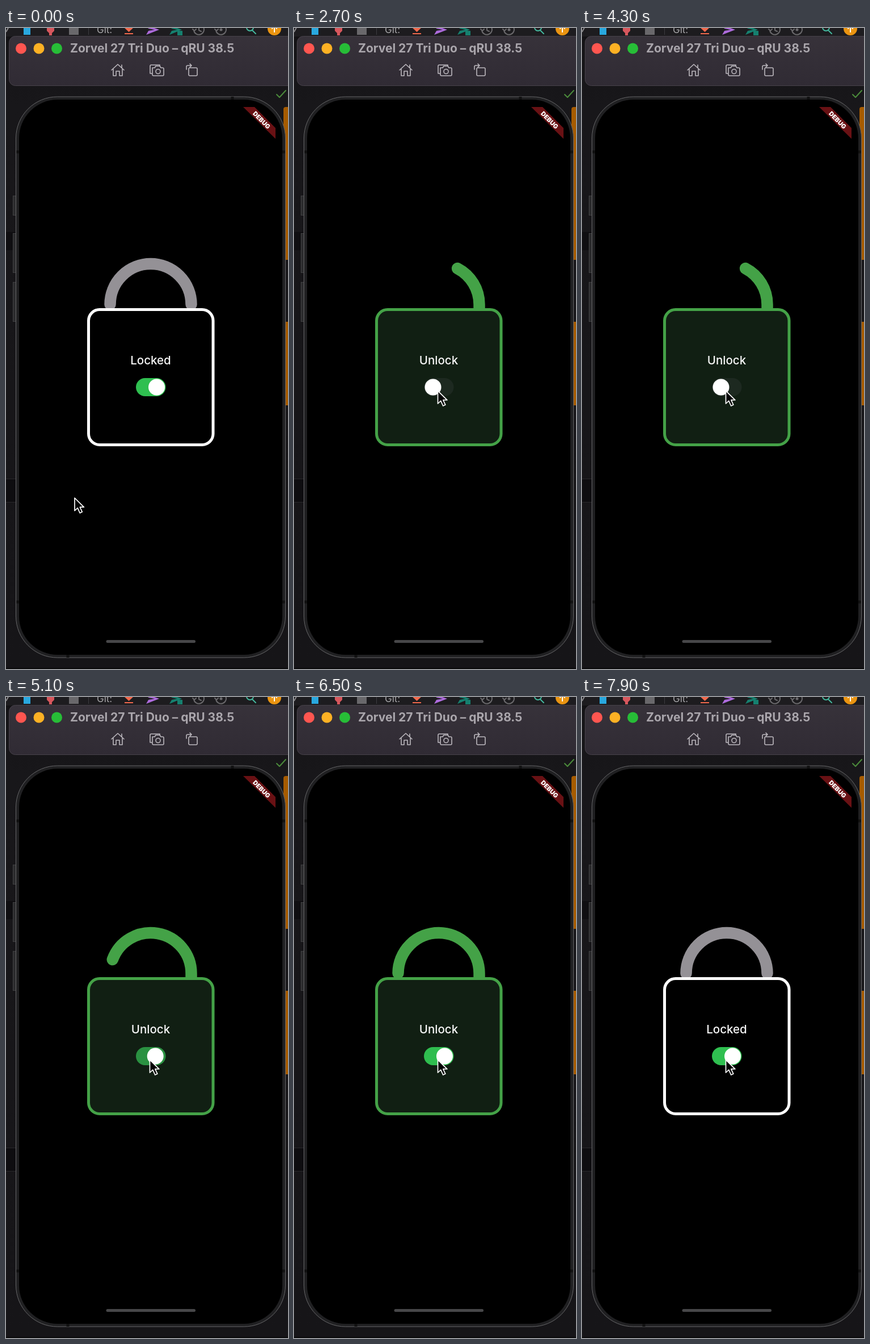
An HTML page for the animation above (8 s loop, 497 px wide and 1128 px high).

```html
<!DOCTYPE html>
<html lang="en">
<head>
<meta charset="utf-8">
<title>Padlock switch</title>
<style>
  html, body { margin: 0; width: 100%; height: 100%; overflow: hidden; background: #18171a; }
  svg { display: block; width: 100%; height: 100%; }
  text { font-family: Inter, sans-serif; }
  .line { fill: none; stroke-linecap: round; stroke-linejoin: round; }
</style>
</head>
<body>
<svg viewBox="0 0 497 1128">
  <defs>
    <linearGradient id="shade" x2="0" y2="1">
      <stop offset="0" stop-color="#0f0e10"/>
      <stop offset=".03" stop-color="#151417"/>
      <stop offset=".12" stop-color="#18171a"/>
      <stop offset="1" stop-color="#161518"/>
    </linearGradient>
    <linearGradient id="bar" x2="0" y2="1">
      <stop offset="0" stop-color="#37323a"/>
      <stop offset="1" stop-color="#302b34"/>
    </linearGradient>
  </defs>

  <!-- Desktop behind the window -->
  <rect width="497" height="1128" fill="url(#shade)"/>
  <rect y="359" width="18" height="32" fill="#0f0e11"/>
  <rect y="793" width="18" height="42" fill="#0e0d10"/>
  <path d="M0 793.5H17M0 834.5H17" stroke="#29282b"/>
  <rect x="489" y="139" width="12" height="269" rx="4" fill="#a65b00"/>
  <rect x="491" y="517" width="10" height="147" fill="#a65b00"/>
  <path class="line" d="M477 117L482 122L493 110" stroke="#4b8b3b" stroke-width="2"/>
  <rect y="1126" width="497" height="2" fill="#09090a"/>

  <!-- Editor toolbar -->
  <rect width="497" height="15" fill="#1d1c1f"/>
  <path d="M0 7L4 0" stroke="#8a898c" stroke-width="2"/>
  <rect x="31" y="0" width="12" height="12" fill="#29a8df"/>
  <path d="M72 0H85V5L81 9V13H76V9L72 5Z" fill="#d7575d"/>
  <rect x="111" y="-5" width="17" height="17" fill="#69686b"/>
  <path d="M145.5 0V12" stroke="#3d3c40"/>
  <text x="160" y="9" font-size="17" fill="#a7a6a9">Git:</text>
  <path d="M209 0H224L216.500 7ZM209 9H224V11H209Z" fill="#f2694d"/>
  <path d="M247 -5L270 3L247 12L251 5L262 3L251 1Z" fill="#ad6bdc"/>
  <path d="M288 -5L310 3L288 12L292 5L302 3L292 1Z" fill="#16806f"/>
  <rect x="302" y="5" width="9" height="8" fill="#16806f"/>
  <g class="line" stroke="#69686b" stroke-width="2">
    <path d="M331 4A9 9 0 1 0 334 -4M329 2L332 5L335 2M340 -2V4L344 6"/>
    <path d="M370 4A9 9 0 1 0 373 -4M368 2L371 5L374 2"/>
  </g>
  <circle cx="379" cy="3" r="2.500" fill="#69686b"/>
  <path class="line" d="M434 4L440 10M424 -1A6 6 0 1 0 436 -1A6 6 0 1 0 424 -1" stroke="#43b79d" stroke-width="2"/>
  <circle cx="473" cy="1" r="12" fill="#ea9411"/>
  <path class="line" d="M473 7V-4M469 1L473 -4L477 1" stroke="#fff" stroke-width="2"/>

  <!-- Simulator title bar -->
  <rect x="5.500" y="14.500" width="510" height="87" rx="11" fill="url(#bar)" stroke="#47424a"/>
  <circle cx="26.500" cy="36" r="9.500" fill="#ff5650"/>
  <circle cx="58" cy="36" r="9.500" fill="#fdb124"/>
  <circle cx="89.500" cy="36" r="9.500" fill="#27bd37"/>
  <text x="113" y="43" font-size="21" font-weight="700" fill="#aaa6ac">Zorvel 27 Tri Duo – qRU 38.5</text>
  <g class="line" stroke="#bcb8be" stroke-width="1.600">
    <path d="M186 74L197 64L208 74M189 72V84H194V76H200V84H205V72M204 70V65"/>
    <path d="M257 80H254V67Q254 65 256 65H271V67M258 70H262L264 67H271L273 70H276Q278 70 278 72V82Q278 84 276 84H260Q258 84 258 82Z"/>
    <circle cx="268" cy="76.500" r="4"/>
    <rect x="322" y="70" width="15" height="14" rx="2"/>
    <path d="M318 73V68Q318 66 320 66H327M324 63L327 66L324 69"/>
  </g>

  <!-- Phone -->
  <g fill="#2b2b2d" stroke="#414143">
    <rect x="12.500" y="295.500" width="7" height="34"/>
    <rect x="12.500" y="361.500" width="7" height="69"/>
    <rect x="12.500" y="447.500" width="7" height="69"/>
  </g>
  <rect x="17.500" y="121" width="475" height="987" rx="73" fill="#202022" stroke="#666668"/>
  <path d="M18 218H23M487 218H492M18 1010H23M487 1010H492M399 121V126M109 1103V1108" stroke="#111" stroke-width="5"/>
  <rect x="23" y="126" width="464" height="977" rx="68"/>
  <path d="M418 139H438L475 176V195Z" fill="#691114"/>
  <text transform="translate(450.500 162) rotate(45)" y="4" text-anchor="middle" font-size="11" font-weight="900" fill="#fff">DEBUG</text>
  <rect x="176.500" y="1077" width="157.500" height="5" rx="2.500" fill="#474749"/>

  <!-- Padlock -->
  <path id="shackle" class="line" stroke-width="20.500"/>
  <rect id="body" x="145.500" y="495.500" width="219.500" height="238" rx="19.500" stroke-width="5"/>
  <text id="label" x="255" y="592" text-anchor="middle" font-size="20.500" font-weight="500" fill="#f7f7f7"></text>
  <rect id="track" x="229" y="616" width="52.500" height="32" rx="16"/>
  <circle id="thumb" cy="632" r="14.500" fill="#fff"/>

  <path id="cursor" d="M0 0V22.500L5.200 17.700L9.200 26.500L13.300 24.600L9.300 16.200H16.300Z" stroke="#fff" stroke-width="1.700" stroke-linejoin="round"/>
</svg>
<script>
const LOOP = 8000;
const SHACKLE_MS = 300;
const SWITCH_MS = 290;
const OPEN_ANGLE = 62.5;
const CENTER = { x: 255, y: 486.5, r: 71.5 };
// Clicks alternate: unlock, lock, unlock, ...
const CLICKS = [1750, 2850, 3600, 4350, 5050, 5725, 6500, 7250];

const el = id => document.getElementById(id);
const set = (id, attrs) => {
  for (const name in attrs) el(id).setAttribute(name, attrs[name]);
};
const progress = (t, start, length) => Math.min(1, Math.max(0, (t - start) / length));
const smooth = p => p * p * (3 - 2 * p);
const mix = (a, b, p) => a + (b - a) * p;
const mixColor = (a, b, p) => `rgb(${a.map((v, i) => Math.round(mix(v, b[i], p)))})`;

function drawLock(t) {
  const count = CLICKS.filter(click => click <= t).length;
  const locked = count % 2 === 0;
  const since = count ? t - CLICKS[count - 1] : LOOP;
  const toward = p => locked ? p : 1 - p;

  const sweep = mix(OPEN_ANGLE, 180, toward(progress(since, 0, SHACKLE_MS)));
  const angle = sweep * Math.PI / 180;
  const { x, y, r } = CENTER;
  const foot = locked ? '' : `M${x + r} ${y + 8}V${y}`;
  set('shackle', {
    d: `${foot || `M${x + r} ${y}`}A${r} ${r} 0 0 0 ${x + r * Math.cos(angle)} ${y - r * Math.sin(angle)}`,
    stroke: locked ? '#949196' : '#44a247'
  });
  set('body', {
    fill: locked ? '#000' : '#111f13',
    stroke: locked ? '#fff' : '#44a247'
  });
  el('label').textContent = locked ? 'Locked' : 'Unlock';

  const on = toward(smooth(progress(since, -10, SWITCH_MS)));
  const off = locked ? [29, 34, 34] : [29, 41, 32];
  set('track', { fill: mixColor(off, [47, 191, 80], on ** 3) });
  set('thumb', { cx: mix(245, 265.5, on) });
}

function drawCursor(t) {
  const approach = smooth(progress(t, 100, 1000));
  const settle = smooth(progress(t, 1350, 300));
  const x = mix(121, 252.5, approach) + settle;
  const y = mix(827, 647, approach) - 8.5 * settle;
  set('cursor', { transform: `translate(${x} ${y})` });
}

function frame() {
  const t = performance.now() % LOOP;
  drawLock(t);
  drawCursor(t);
  requestAnimationFrame(frame);
}
frame();
</script>
</body>
</html>
```
